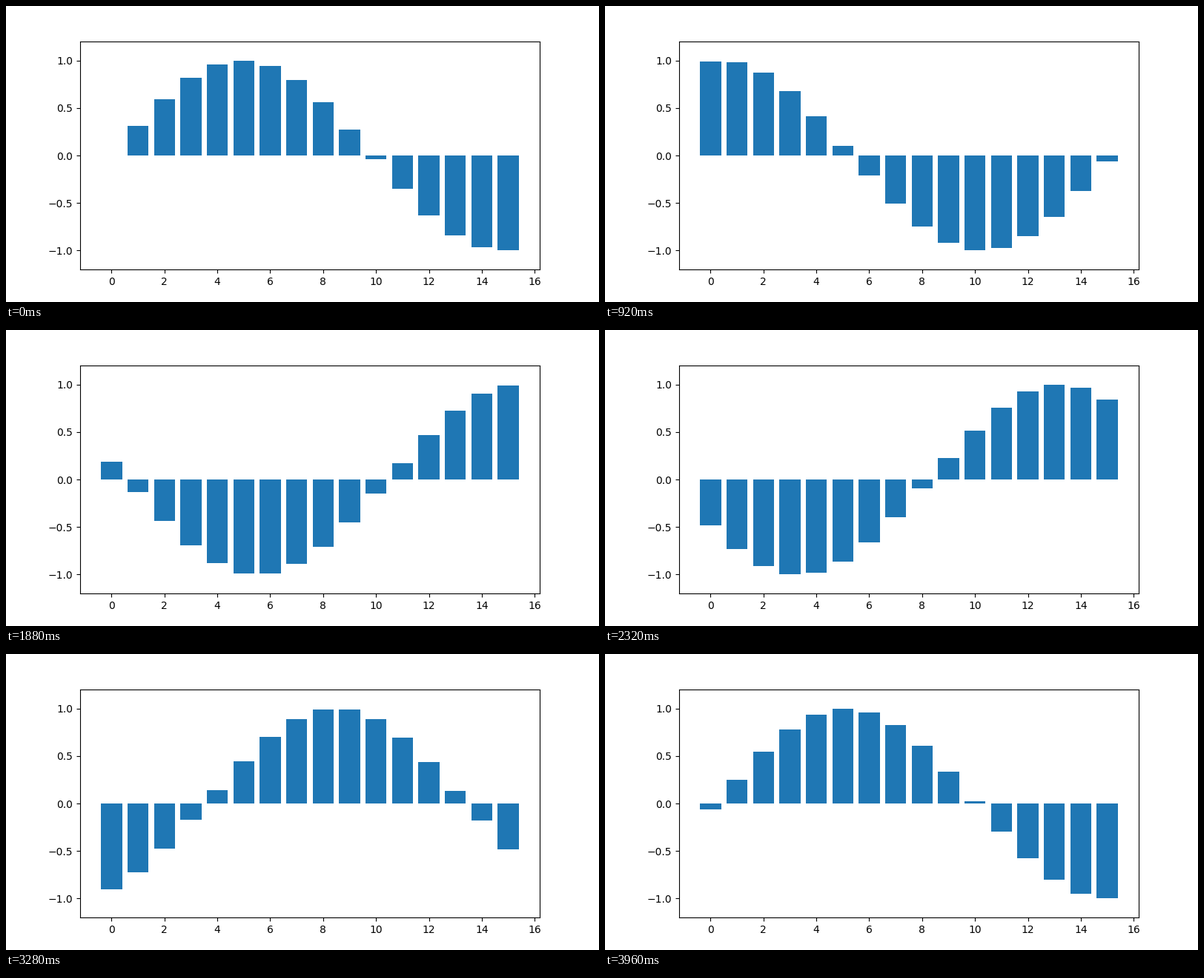
Write a matplotlib script that moves like this. It is 800 px wide and 400 px high and loops after 4000 ms.

```python
import numpy as np
import matplotlib.pyplot as plt
from matplotlib.animation import FuncAnimation

FRAMES = 100
INTERVAL = 40

x = np.arange(16)


def heights(frame):
    return np.sin(x / np.pi + 2 * np.pi * frame / FRAMES)


fig, ax = plt.subplots(figsize=(8, 4), dpi=100)
bars = ax.bar(x, heights(0))
ax.set_xlim(-1.19, 16.19)
ax.set_ylim(-1.2, 1.2)


def update(frame):
    for bar, h in zip(bars, heights(frame)):
        bar.set_height(h)
    return bars.patches


anim = FuncAnimation(fig, update, frames=FRAMES, interval=INTERVAL,
                     repeat=True, repeat_delay=0)
plt.show()
```
